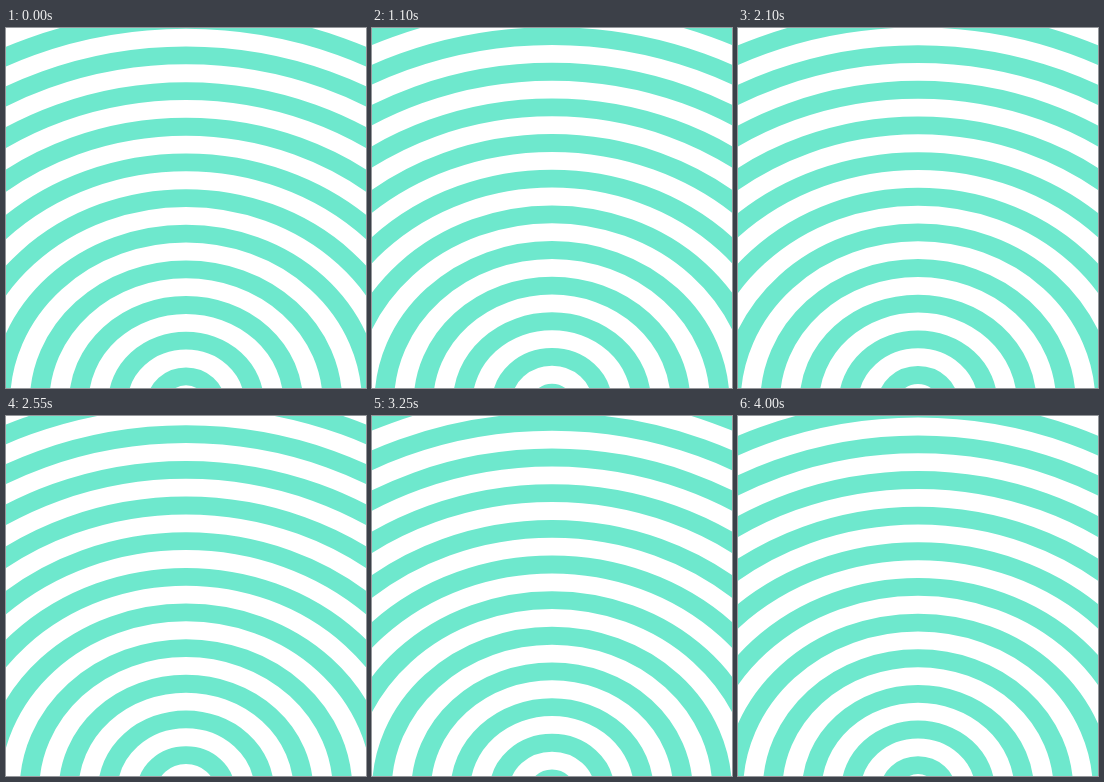
Animation of 360 by 360 pixels, one loop 4.05 s. Source, as an HTML page with a canvas:

```html
<!DOCTYPE html>
<html lang="en">
<head>
<meta charset="utf-8">
<title>Ripples</title>
<style>
html, body { margin: 0; width: 100%; height: 100%; overflow: hidden; background: #fff; }
canvas { display: block; }
</style>
</head>
<body>
<canvas width="360" height="360"></canvas>
<script>
const ctx = document.querySelector('canvas').getContext('2d');
const LOOP = 4050, STEP = 50;
const GAP = 35.65;              // vertical distance between neighbouring rings
const CX = 180, CY = 374.5;     // centre lies just below the stage
const STRETCH = 1.1;            // rings are wider than tall
const START = 26.2, MAX = 440;

function draw(ms) {
  const time = Math.floor(ms % LOOP / STEP) * STEP;
  // Rings move outward by two gaps per loop.
  const first = (START + 2 * GAP * time / LOOP) % GAP;
  ctx.setTransform(1, 0, 0, 1, 0, 0);
  ctx.fillStyle = '#fff';
  ctx.fillRect(0, 0, 360, 360);
  ctx.setTransform(STRETCH, 0, 0, 1, CX, CY);
  ctx.strokeStyle = '#6ee8cd';
  ctx.lineWidth = GAP / 2;
  for (let r = first; r < MAX; r += GAP) {
    ctx.beginPath();
    ctx.arc(0, 0, r, 0, 2 * Math.PI);
    ctx.stroke();
  }
}

const start = performance.now();
function frame() {
  draw(performance.now() - start);
  requestAnimationFrame(frame);
}
frame();
</script>
</body>
</html>
```
